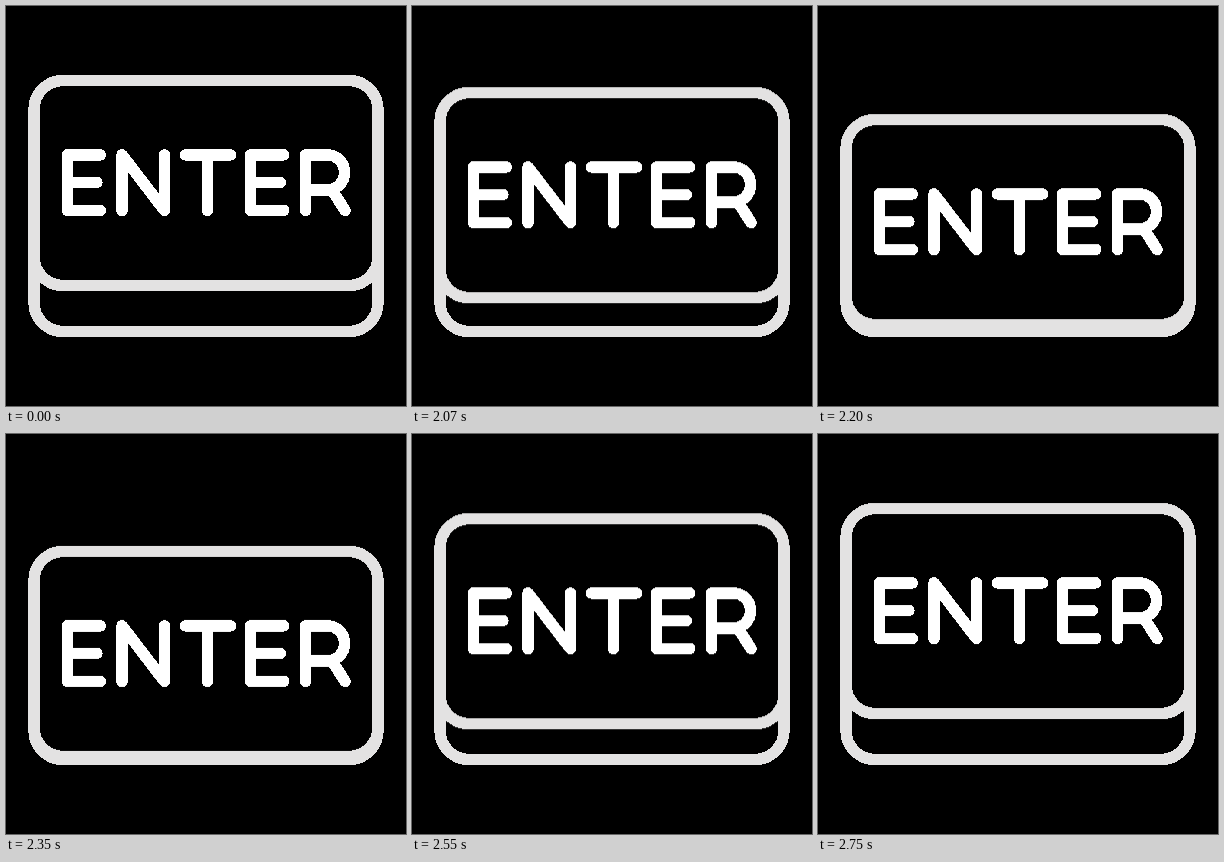
Animation, 400 px wide and 400 px high, one loop 2770 ms. Source, as an HTML page without scripts:

```html
<!DOCTYPE html>
<html lang="en">
<head>
<meta charset="utf-8">
<title>Enter key</title>
<style>
  html, body { margin: 0; width: 100%; height: 100%; overflow: hidden; background: #000; }
  svg { display: block; width: 100vw; height: 100vh; fill: none; stroke-width: 11.5; shape-rendering: crispEdges; }
  .frame { stroke: #e3e2e2; }
  .label { stroke: #fff; stroke-linecap: round; stroke-linejoin: round; }
  .cap { animation: press 2770ms infinite; }

  /* rest, press down, then release */
  @keyframes press {
    0% { transform: translateY(0); }
    71.9% { transform: translateY(0); animation-timing-function: cubic-bezier(.3, 0, .3, 1); }
    83.6% { transform: translateY(44px); animation-timing-function: cubic-bezier(.3, 0, .3, 1); }
    100% { transform: translateY(0); }
  }
</style>
</head>
<body>
<svg viewBox="0 0 400 400" role="img" aria-label="ENTER">
  <defs>
    <path id="e" d="M33 0H0V55.500H33M0 27.500H29.500"/>
  </defs>
  <path class="frame" d="M28 244V296.500a29 29 0 0 0 29 29H343a29 29 0 0 0 29-29V244"/>
  <g class="cap">
    <rect class="frame" x="28" y="74.500" width="344" height="205" rx="29"/>
    <g class="label">
      <use href="#e" x="61.300" y="148.900"/>
      <path d="M116 204.400V148.900L158.500 204.400V148.900"/>
      <path d="M179.500 148.900H224.500M201.500 148.900V204.400"/>
      <use href="#e" x="244.700" y="148.900"/>
      <path d="M299.700 204.400V148.900H321a17.600 17.600 0 0 1 0 35.200H299.700M326 184L339 204.400"/>
    </g>
  </g>
</svg>
</body>
</html>
```
